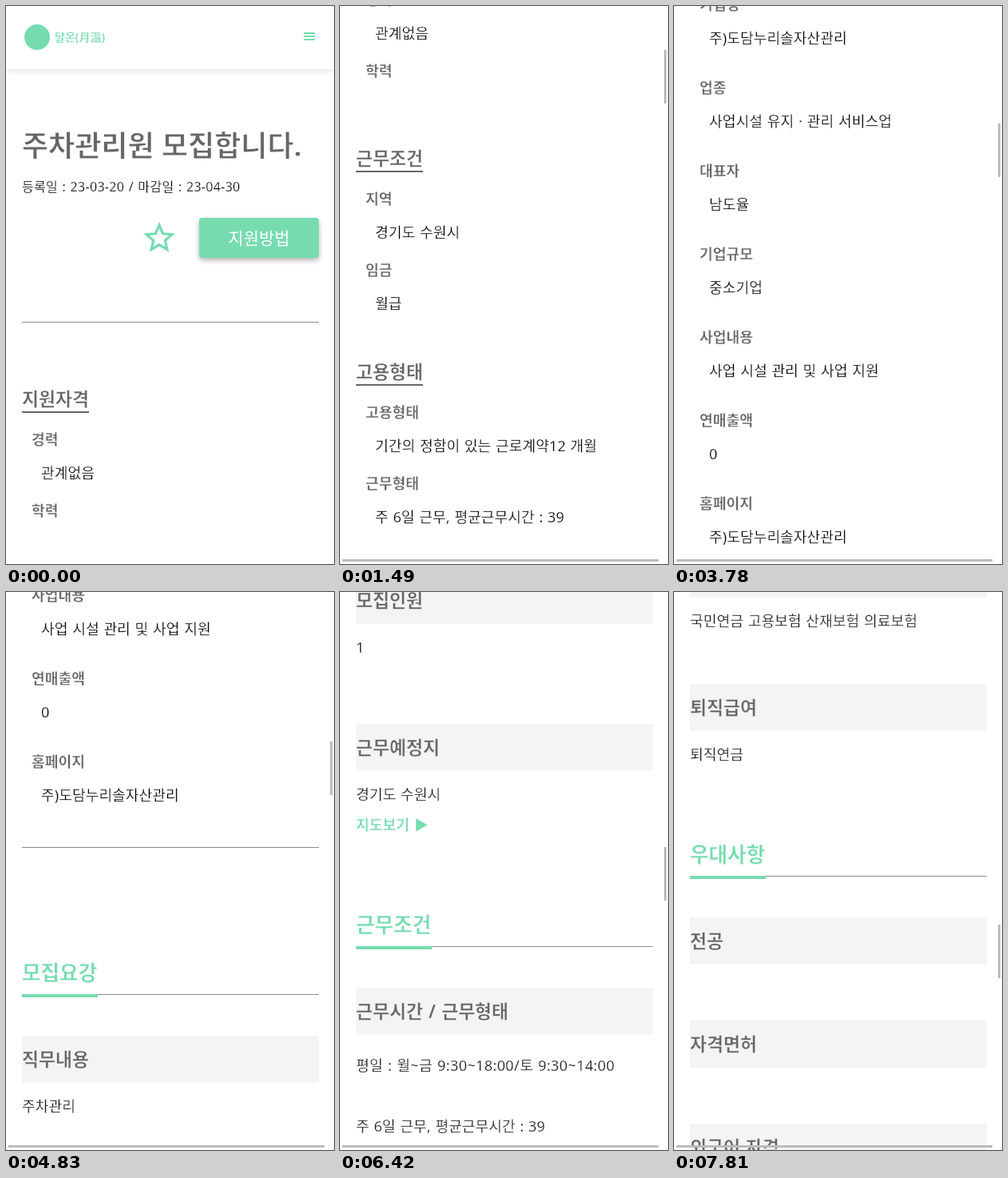
Animation, 411 px wide and 698 px high, one loop 8000 ms. Source, as an HTML page:

```html
<!DOCTYPE html>
<html lang="ko">
<head>
<meta charset="utf-8">
<title>주차관리원 모집</title>
<style>
  :root { --mint: #76dcb0; --ink: #666; }
  html, body { margin: 0; width: 100%; height: 100%; overflow: hidden; background: #fff; }
  body { position: relative; font-family: "Noto Sans", "Noto Sans CJK KR", "Noto Sans CJK", sans-serif; color: #000; }
  #page { position: absolute; left: 0; top: 0; width: 411px; will-change: transform; }
  #page > * { position: absolute; }
  header { left: 0; top: 0; width: 411px; height: 79px; background: #fff; box-shadow: 0 0 10px rgba(0, 0, 0, .16); }
  header * { position: absolute; }
  .mark { left: 23px; top: 23px; width: 32px; height: 32px; border-radius: 50%; background: var(--mint); }
  .brand { left: 61px; top: 39px; font-size: 14px; font-weight: 700; color: var(--mint); }
  .menu { left: 373px; top: 33px; width: 14px; height: 2px; background: var(--mint); box-shadow: 0 4px var(--mint), 0 8px var(--mint); }
  /* text sits centred on its top coordinate; a thin outline in the ground colour lightens the weight */
  .t { line-height: 0; white-space: pre; word-spacing: 1px; -webkit-text-stroke: .3px #fff; }
  .title { left: 20px; font-size: 36px; font-weight: 700; color: var(--ink); word-spacing: 0; -webkit-text-stroke-width: .8px; }
  .date { left: 20px; font-size: 16px; letter-spacing: .3px; }
  .sec, .head { left: 20px; font-size: 22.8px; font-weight: 700; color: var(--ink); -webkit-text-stroke-width: .4px; }
  .head { -webkit-text-stroke-color: #f4f4f4; }
  .sub { left: 32px; font-size: 18.2px; font-weight: 600; color: var(--ink); }
  .val, .txt { font-size: 18.2px; }
  .val { left: 44px; }
  .txt { left: 20px; color: #181818; }
  .hours { letter-spacing: .3px; }
  .link { left: 20px; font-size: 18.2px; font-weight: 700; color: var(--mint); }
  .part { left: 20px; font-size: 25.6px; font-weight: 700; color: var(--mint); }
  .under { left: 20px; width: 84px; height: 2px; background: var(--ink); }
  .line { left: 20px; width: 372px; height: 1px; background: #8c8c8c; }
  .strong { left: 20px; width: 95px; height: 4px; background: var(--mint); }
  .band { left: 20px; width: 372px; height: 59px; background: #f4f4f4; }
  .star { left: 168px; top: 266px; }
  .apply { left: 242px; top: 265px; width: 150px; height: 50px; border-radius: 4px; background: var(--mint);
    box-shadow: 0 3px 6px rgba(0, 0, 0, .3); color: #fff; font-size: 20.9px; line-height: 50px; text-align: center; }
  .bar { position: absolute; background: #bcbcbc; }
  #thumb { left: 406px; top: 0; width: 3px; height: 67px; }
  #across { left: 3px; top: 692px; width: 396px; height: 3px; }
</style>
</head>
<body>
<div id="page">
  <header>
    <div class="mark"></div>
    <div class="t brand">달온(月溫)</div>
    <div class="menu"></div>
  </header>
  <svg class="star" width="48" height="48" viewBox="0 0 24 24" fill="#76dcb0" fill-rule="evenodd">
    <path d="M22 9.24l-7.19-.62L12 2 9.19 8.63 2 9.24l5.46 4.73L5.82 21 12 17.27 18.18 21l-1.63-7.03zM12 15.4l-3.76 2.27 1-4.28-3.32-2.88 4.38-.38L12 6.1l1.71 4.04 4.38.38-3.32 2.88 1 4.28z"/>
  </svg>
  <div class="apply">지원방법</div>
</div>
<div class="bar" id="thumb"></div>
<div class="bar" id="across"></div>
<script>
const page = document.getElementById('page');
const thumb = document.getElementById('thumb');
const across = document.getElementById('across');

function add(cls, y, text = '') {
  const el = document.createElement('div');
  el.className = cls;
  el.style.top = y + 'px';
  el.textContent = text;
  page.append(el);
}
const put = (cls, y, text) => add('t ' + cls, y, text);
const rule = y => add('line', y);

function section(y, text) {
  put('sec', y + 1, text);
  add('under', y + 16);
}
function pair(y, label, value) {
  put('sub', y, label);
  if (value) put('val', y + 42, value);
}
function part(y, text) {
  put('part', y, text);
  rule(y + 26);
  add('strong', y + 26);
}
function block(y, label, lines = []) {
  add('band', y);
  put('head', y + 30, label);
  lines.forEach((s, i) => put('txt', y + 88 + 38 * i, s));
}

const company = '주)도담누리솔자산관리';
const term = '기간의 정함이 있는 근로계약12 개월';
const week = '주 6일 근무, 평균근무시간 : 39';

put('title', 175, '주차관리원 모집합니다.');
put('date', 226, '등록일 : 23-03-20 / 마감일 : 23-04-30');
rule(395);
section(491, '지원자격');
pair(542, '경력', '관계없음');
pair(631, '학력');
section(740, '근무조건');
pair(791, '지역', '경기도 수원시');
pair(880, '임금', '월급');
section(1007, '고용형태');
pair(1058, '고용형태', term);
pair(1147, '근무형태', week);
section(1274, '복리후생');
pair(1325, '복리후생');
rule(1390);
section(1445, '기업정보');
[
  ['기업명', company],
  ['업종', '사업시설 유지ㆍ관리 서비스업'],
  ['대표자', '남도율'],
  ['기업규모', '중소기업'],
  ['사업내용', '사업 시설 관리 및 사업 지원'],
  ['연매출액', '0'],
  ['홈페이지', company]
].forEach(([label, value], i) => pair(1501 + 104 * i, label, value));

rule(2232);
part(2390, '모집요강');
block(2468, '직무내용', ['주차관리']);
block(2652, '경력조건', ['관계없음']);
block(2836, '학력');
block(3020, '고용형태', [term, '파견근로 비희망', '대체인력채용 비희망']);
block(3263, '모집인원', ['1']);
block(3447, '근무예정지', ['경기도 수원시']);
put('link', 3573, '지도보기 \u25B6\uFE0E');
part(3699, '근무조건');
block(3777, '근무시간 / 근무형태');
put('txt hours', 3874, '평일 : 월~금 9:30~18:00/토 9:30~14:00');
put('txt', 3950, week);
block(4046, '임금조건', ['월급']);
block(4230, '사회보험', ['국민연금 고용보험 산재보험 의료보험']);
block(4397, '퇴직급여', ['퇴직연금']);
part(4611, '우대사항');
['전공', '자격면허', '외국어 자격'].forEach((s, i) => block(4689 + 129 * i, s));

// scroll path: [ms, px]
const path = [
  [0, 0], [860, 0], [1050, 80], [1490, 550], [1700, 680],
  [2110, 680], [2300, 770], [2670, 1051], [2950, 1240], [3090, 1250],
  [3290, 1250], [3500, 1310], [3780, 1503], [4130, 1880], [4270, 1896],
  [4760, 1896], [4970, 2010], [5250, 2440], [5530, 2651], [5670, 2652],
  [5930, 2652], [6100, 2790], [6420, 3282], [6700, 3480],
  [6970, 3480], [7200, 3680], [7500, 4090], [7810, 4282], [8000, 4282]
];
const stops = [0, 1700, 3090, 4270, 5670, 6700, 7810];
const LOOP = 8000, STEP = 70;

const slope = i => (path[i + 1][1] - path[i][1]) / (path[i + 1][0] - path[i][0]);
// harmonic-mean tangents keep the curve monotone
const tangents = path.map((p, i) => {
  if (i === 0 || i === path.length - 1) return 0;
  const a = slope(i - 1), b = slope(i);
  return a * b > 0 ? 2 * a * b / (a + b) : 0;
});

function scrollAt(t) {
  let i = 0;
  while (i < path.length - 2 && t >= path[i + 1][0]) i++;
  const [t0, y0] = path[i], [t1, y1] = path[i + 1];
  const d = t1 - t0, u = (t - t0) / d, v = 1 - u;
  return y0 * v * v * (1 + 2 * u) + y1 * u * u * (3 - 2 * u)
    + d * u * v * (tangents[i] * v - tangents[i + 1] * u);
}

// the picture advances in 70 ms steps that land on each stop
function snap(t) {
  const n = stops.findIndex(s => s >= t);
  if (n < 0) return LOOP;
  if (n === 0) return 0;
  return Math.max(stops[n - 1], stops[n] - Math.ceil((stops[n] - t) / STEP) * STEP);
}

function barAlpha(t) {
  if (t < 930 || (t >= 2030 && t < 2170) || (t >= 4670 && t < 4830)) return 0;
  return t >= 4600 && t < 4670 ? .5 : 1;
}

const begin = performance.now();
function draw() {
  const t = (performance.now() - begin) % LOOP;
  const y = Math.round(scrollAt(snap(t)));
  page.style.transform = `translateY(${-y}px)`;
  thumb.style.transform = `translateY(${Math.round(1.8 + y * .0967)}px)`;
  thumb.style.opacity = across.style.opacity = barAlpha(t);
  requestAnimationFrame(draw);
}
draw();
</script>
</body>
</html>
```
